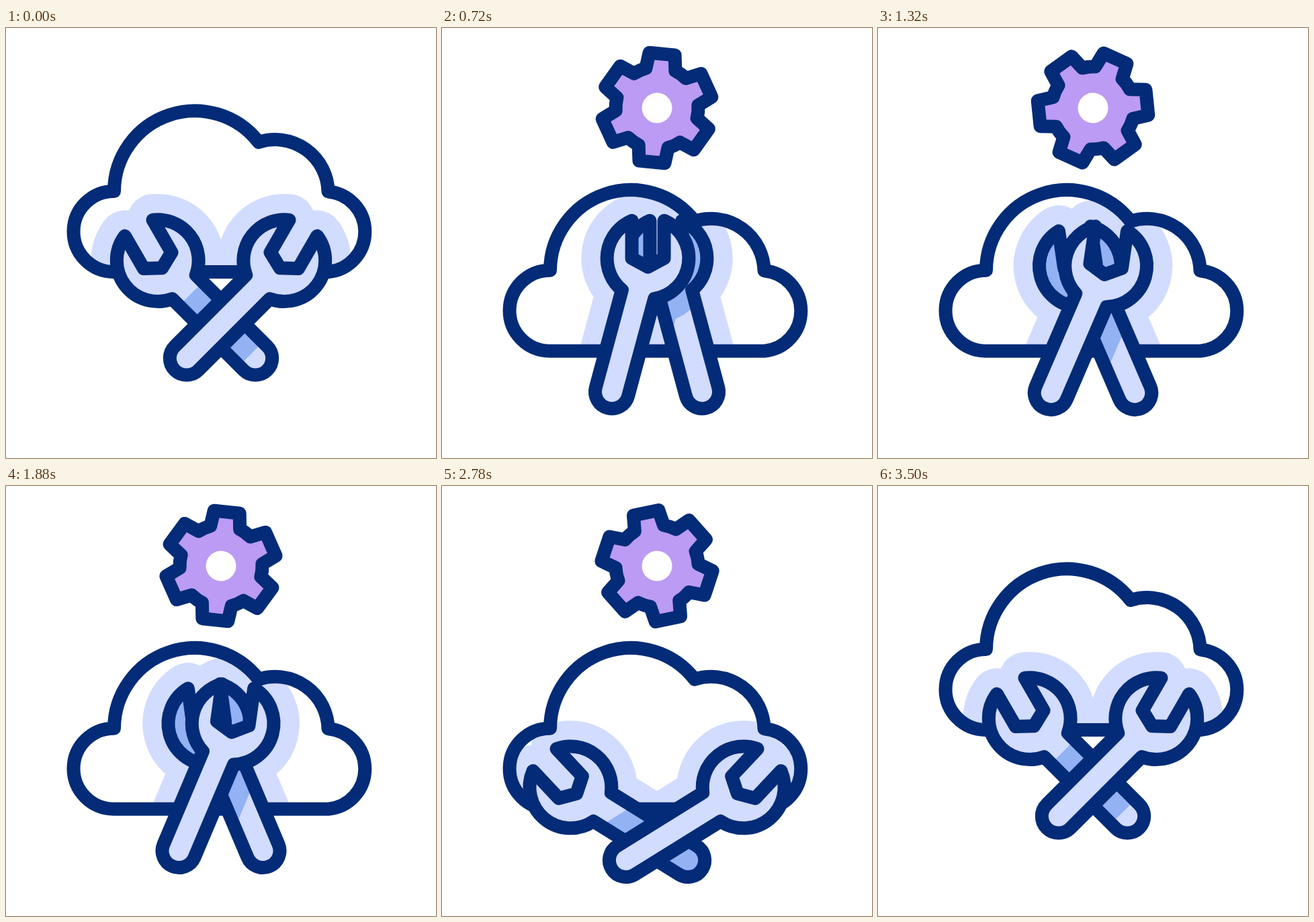
These frames come from a looping animation (640x640 px, 3.6 s). An HTML page with a canvas:

```html
<!DOCTYPE html>
<html lang="en">
<head>
<meta charset="utf-8">
<title>Cloud maintenance</title>
<style>
  html, body { margin: 0; width: 100%; height: 100%; overflow: hidden; background: #fff; }
  canvas { display: block; width: 100vmin; height: 100vmin; margin: auto; }
</style>
</head>
<body>
<canvas id="stage"></canvas>
<script>
const SIZE = 640, LOOP = 3600, RAD = Math.PI / 180;
const INK = '#032b77', PALE = '#d2dcfe', SHADE = '#92b2f4', VIOLET = '#bb9bf3', WHITE = '#fff';
const LINE = 20, HALO = 76.5;

const canvas = document.getElementById('stage');
const ctx = canvas.getContext('2d');
const ratio = window.devicePixelRatio || 1;
canvas.width = canvas.height = SIZE * ratio;
ctx.lineJoin = ctx.lineCap = 'round';

// Time and value of each key
const swing = [[0, 45], [400, 58.4], [1000, -20], [1600, 58.4], [2200, -20], [2800, 58.4], [3400, 45]];
const drop = [[0, 0], [400, 1], [2800, 1], [3400, 0]];
const rise = [[0, 0], [600, 1], [2800, 1], [3500, 0]];
const spin = [[0, -20], [720, 5.3], [1320, 84], [1880, 186], [2260, 267], [2780, 348.2], [3500, 415]];

const segment = (keys, t) => {
  let i = 0;
  while (i < keys.length - 2 && t > keys[i + 1][0]) i++;
  return i;
};

// Ease in and out between keys
function eased(keys, t) {
  const i = segment(keys, t), [t0, a] = keys[i], [t1, b] = keys[i + 1];
  const p = Math.min(1, (t - t0) / (t1 - t0));
  return a + (b - a) * p * p * (3 - 2 * p);
}

// Smooth curve through all keys
function flowing(keys, t) {
  const i = segment(keys, t), [t0, a] = keys[i], [t1, b] = keys[i + 1];
  const slope = k => {
    const p = keys[Math.max(0, k - 1)], q = keys[Math.min(keys.length - 1, k + 1)];
    return (q[1] - p[1]) / (q[0] - p[0]);
  };
  const d = t1 - t0, p = Math.min(1, (t - t0) / d), r = 1 - p;
  return a * (1 + 2 * p) * r * r + slope(i) * d * p * r * r
       + b * p * p * (3 - 2 * p) - slope(i + 1) * d * p * p * r;
}

const cloud = new Path2D(
  'M160 363 A60 60 0 0 1 161 243 A120 120 0 0 1 376 170 ' +
  'A79 79 0 0 1 479.5 243.5 A60 60 0 0 1 480 363 Z');

// Upright wrench, origin at the tip of its handle
const wrench = (() => {
  const R = 61, W = 25, headY = -241.3, endY = -35.5, tilt = -15 * RAD;
  const neck = headY + Math.sqrt(R * R - W * W);
  const jaw = [[-24, -56], [-24, 0], [0, 13], [24, 0], [24, -56]].map(([x, y]) => [
    x * Math.cos(tilt) - y * Math.sin(tilt),
    headY + x * Math.sin(tilt) + y * Math.cos(tilt)
  ]);
  return new Path2D(
    `M${jaw.join('L')} A${R} ${R} 0 0 1 ${W} ${neck} L${W} ${endY} ` +
    `A${W} ${W} 0 0 1 ${-W} ${endY} L${-W} ${neck} A${R} ${R} 0 0 1 ${jaw[0]} Z`);
})();

const gear = (() => {
  const path = new Path2D();
  const at = (deg, r) => [r * Math.sin(deg * RAD), -r * Math.cos(deg * RAD)];
  for (let a = 0; a < 360; a += 60) {
    path.lineTo(...at(a - 21, 61.5));
    path.lineTo(...at(a - 13.3, 83));
    path.lineTo(...at(a + 13.3, 83));
    path.lineTo(...at(a + 21, 61.5));
    path.arc(0, 0, 61.5, (a - 69) * RAD, (a - 51) * RAD);
  }
  path.closePath();
  return path;
})();

function fill(path, color) {
  ctx.fillStyle = color;
  ctx.fill(path);
}

function outline(path, color = INK, width = LINE) {
  ctx.strokeStyle = color;
  ctx.lineWidth = width;
  ctx.stroke(path);
}

function within(place, draw) {
  ctx.save();
  place();
  draw();
  ctx.restore();
}

function drawGear(t) {
  const up = eased(rise, t);
  if (up < 0.001) return;
  within(() => {
    ctx.translate(320, 223 - 104 * up);
    ctx.rotate(flowing(spin, t) * RAD);
  }, () => {
    fill(gear, VIOLET);
    outline(gear);
    ctx.beginPath();
    ctx.arc(0, 0, 22.5, 0, 7);
    ctx.fillStyle = WHITE;
    ctx.fill();
  });
}

function draw(t) {
  const down = eased(drop, t), angle = eased(swing, t) * RAD;
  const front = () => {
    ctx.translate(243.7, 516.7 + 59 * down);
    ctx.rotate(angle);
  };
  const back = () => {
    ctx.translate(SIZE, 0);
    ctx.scale(-1, 1);
    front();
  };
  const halo = color => {
    fill(wrench, color);
    outline(wrench, color, HALO);
  };

  ctx.setTransform(canvas.width / SIZE, 0, 0, canvas.height / SIZE, 0, 0);
  ctx.fillStyle = WHITE;
  ctx.fillRect(0, 0, SIZE, SIZE);

  drawGear(t);

  const shift = 117.7 * down;
  within(() => ctx.translate(0, shift), () => {
    fill(cloud, WHITE);
    within(() => {
      ctx.clip(cloud);
      ctx.translate(0, -shift);
    }, () => {
      within(back, () => halo(PALE));
      within(front, () => halo(PALE));
    });
    outline(cloud);
  });

  // The front wrench shades the one behind it
  within(back, () => fill(wrench, PALE));
  within(() => {
    const base = ctx.getTransform();
    back();
    ctx.clip(wrench);
    ctx.setTransform(base);
    front();
  }, () => halo(SHADE));
  within(back, () => outline(wrench));

  within(front, () => {
    fill(wrench, PALE);
    outline(wrench);
  });
}

const start = performance.now();
function tick() {
  draw((performance.now() - start) % LOOP);
  requestAnimationFrame(tick);
}
tick();
</script>
</body>
</html>
```
